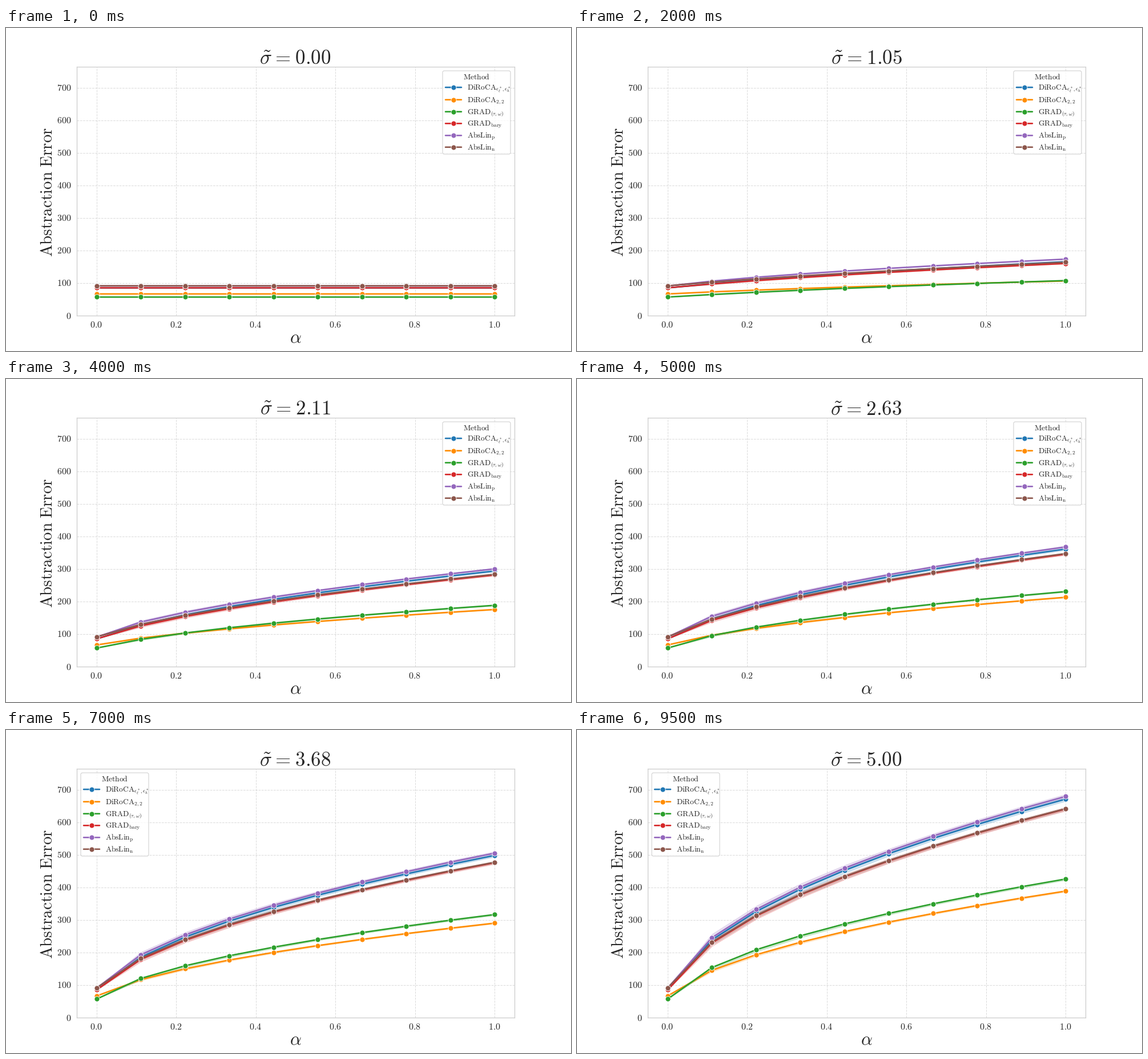
A matplotlib script that plays this animation: 990x566 px, repeating every 10 s.

```python
import numpy as np
import matplotlib.pyplot as plt
from matplotlib.animation import FuncAnimation
from matplotlib.collections import PolyCollection
from matplotlib.patches import FancyBboxPatch

W, H, DPI = 990, 566, 72  # at 72 dpi one point is one pixel
FRAMES, INTERVAL = 20, 500
LEFT, RIGHT, TOP, BOTTOM = 124, 891, 68, 504
LEGEND_W, LEGEND_H, LEGEND_Y = 119, 146, 75
INK, EDGE = "#262626", "#cccccc"

plt.rcParams.update({"mathtext.fontset": "cm", "text.color": INK})

ALPHA = np.linspace(0, 1, 10)
SPREAD = np.interp(ALPHA, [0, 1 / 9, 1 / 3, 0.6, 1], [0, 1, 0.95, 0.65, 0.6])

# label, colour, base error, growth, early rise, rise scale, band below, band above
METHODS = [
    (r"\mathrm{DiRoCA}_{\epsilon_\ell^*,\epsilon_h^*}", "#1f77b4", 85, 17690, 600, 0.25, 2.0, 1.8),
    (r"\mathrm{DiRoCA}_{2,2}", "#ff8c00", 66.6, 5845, 420, 0.25, 0.9, 0.3),
    (r"\mathrm{GRAD}_{(\tau,\omega)}", "#2ca02c", 57, 7085, 800, 1.2, 1.2, 0.3),
    (r"\mathrm{GRAD}_{\mathrm{bary}}", "#d62728", 85.3, 16100, 560, 0.25, 2.0, 1.4),
    (r"\mathrm{AbsLin}_{\mathrm{p}}", "#9467bd", 91, 18050, 1836, 0.25, 1.4, 2.2),
    (r"\mathrm{AbsLin}_{\mathrm{n}}", "#8c564b", 91.5, 16100, 640, 0.25, 1.6, 1.6),
]


def error_curve(sigma, base, growth, rise, scale):
    noise = ALPHA * sigma**2
    return np.sqrt(base**2 + growth * noise + rise * (1 - np.exp(-noise / scale)))


def pixel_box(x, y, w, h):
    return [x / W, 1 - (y + h) / H, w / W, h / H]


fig = plt.figure(figsize=(W / DPI, H / DPI), dpi=DPI, facecolor="white")


def put(x, y, tex, size, ha="center", **kw):
    return fig.text(x / W, 1 - y / H, f"${tex}$", fontsize=size, ha=ha, va="baseline", **kw)


def line_style(color):
    return dict(color=color, lw=2.6, marker="o", ms=9.1, mec="white", mew=0.85,
                solid_capstyle="round", snap=False)


# Plot area
ax = fig.add_axes(pixel_box(LEFT, TOP, RIGHT - LEFT, BOTTOM - TOP))
ax.set(xlim=(-0.05, 1.05), ylim=(0, 764),
       xticks=np.arange(6) / 5, yticks=np.arange(0, 800, 100))
ax.tick_params(length=0, labelbottom=False, labelleft=False)
ax.grid(color=EDGE, alpha=0.7, lw=1, ls=(0, (3.7, 1.6)))
ax.set_axisbelow(True)
for spine in ax.spines.values():
    spine.set(color=EDGE, linewidth=1.25)

for tick in ax.get_xticks():
    put(158.4 + 697.3 * tick, 525, f"{tick:.1f}", 16)
for tick in ax.get_yticks():
    put(114.5, 509.5 - 0.5707 * tick, f"{tick:.0f}", 16, ha="right")

title = put(507, 62.6, "", 35)
put(507, 552, r"\alpha", 31)
put(87, 287, r"\mathrm{Abstraction\ Error}", 29, rotation=90).set(
    va="center", ha="right", rotation_mode="default")

bands, lines = [], []
for _, color, *_ in METHODS:
    band = PolyCollection([], facecolor=color, edgecolor=color, alpha=0.2, lw=1, zorder=1)
    bands.append(ax.add_collection(band, autolim=False))
    lines += ax.plot(ALPHA, 0 * ALPHA, zorder=2, **line_style(color))

# Legend, laid out in its own pixel coordinates
legend = fig.add_axes(pixel_box(765, LEGEND_Y, LEGEND_W, LEGEND_H), zorder=5)
legend.set(xlim=(0, LEGEND_W), ylim=(LEGEND_H, 0))
legend.axis("off")
legend.add_patch(FancyBboxPatch(
    (0, 0), LEGEND_W, LEGEND_H, boxstyle="round,pad=0,rounding_size=3",
    fc=(1, 1, 1, 0.8), ec=EDGE, lw=1, clip_on=False))
legend.text(59.5, 15, r"$\mathrm{Method}$", fontsize=13.5, ha="center", va="baseline")
for (label, color, *_), y in zip(METHODS, [29, 50.7, 71.7, 92.3, 113.3, 133.8]):
    legend.plot([5, 19, 33], [y] * 3, markevery=[1], **line_style(color))
    legend.text(43, y + 4.5, f"${label}$", fontsize=13.4, va="baseline")


def update(frame):
    sigma = 5 * frame / (FRAMES - 1)
    title.set_text(rf"$\tilde{{\sigma}}\hspace{{0.05}}=\hspace{{0.05}}{sigma:.2f}$")
    for band, line, (_, _, *curve, below, above) in zip(bands, lines, METHODS):
        mean = error_curve(sigma, *curve)
        low = mean - below * sigma * SPREAD
        high = mean + above * sigma * SPREAD
        line.set_ydata(mean)
        band.set_verts([np.c_[np.r_[ALPHA, ALPHA[::-1]], np.r_[low, high[::-1]]]])
    legend_x = 131 if frame >= 14 else 765
    legend.set_position(pixel_box(legend_x, LEGEND_Y, LEGEND_W, LEGEND_H))
    return [title, legend, *bands, *lines]


anim = FuncAnimation(fig, update, frames=FRAMES, interval=INTERVAL,
                     repeat=True, repeat_delay=0, blit=False)
plt.show()
```
